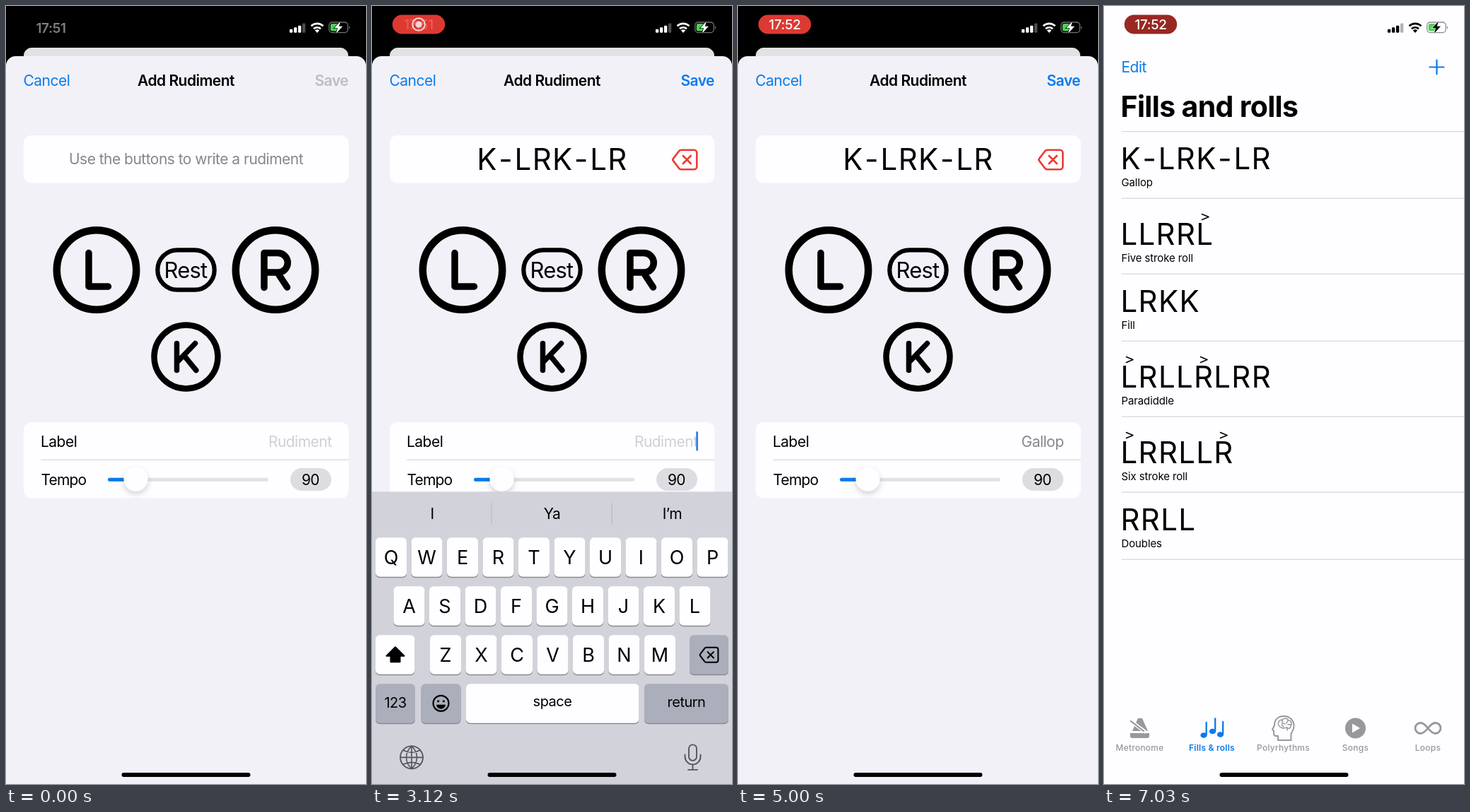
Write an HTML page that moves like this. It is 509 by 1101 pixels and loops after 7.06 s.

```html
<!DOCTYPE html>
<html lang="en">
<head>
<meta charset="utf-8">
<title>Add Rudiment</title>
<style>
html, body { margin: 0; width: 100%; height: 100%; overflow: hidden; background: #000; }
svg { display: block; width: 100vw; height: 100vh; }
text { font-family: Inter, Roboto, sans-serif; font-optical-sizing: none; white-space: pre; }
.dash { letter-spacing: .07em; }
</style>
</head>
<body>
<svg id="stage" viewBox="0 0 509 1101"></svg>
<script>
const LOOP = 7060;
const BLUE = '#0a7aec', WHITE = '#fefdff', PAPER = '#f2f1f8', GRAY = '#98979c';

// [button, down, up]
const taps = [
  ['K', 560, 690], ['-', 850, 960], ['L', 1100, 1200], ['R', 1330, 1440],
  ['K', 1620, 1740], ['-', 1880, 1980], ['L', 2090, 2190], ['R', 2310, 2420]
];
const keys = [
  ['G', 3480, 3560], ['a', 3720, 3790], ['l', 3860, 3920],
  ['l', 3980, 4040], ['o', 4090, 4150], ['p', 4190, 4250]
];
const hints = [
  ['I', 'Ya', 'I’m'], ['Good', 'Got', 'Great'], ['“Ga”', 'Game', 'Gave'],
  ['“Gal”', 'Gals', 'Gallery'], ['“Gall”', 'Gallery', 'Gallon'],
  ['“Gallo”', 'Fallo', 'Galloping'], ['“Gallop”', 'Gallop', 'Galloping']
];
const KB_UP = 2820, KB_DOWN = 4500, DISMISS = 5210;

// markup helpers
const escape = str => str.replace(/&/g, '&amp;').replace(/>/g, '&gt;');
const markup = (x, y, body, o = {}) =>
  `<text x="${x}" y="${y}" ${o.id ? `id="${o.id}"` : ''} text-anchor="${o.at || 'start'}" fill="${o.fill || '#000'}"
   style="font-size:${o.size || 21}px;font-weight:${o.w || 400};letter-spacing:${o.ls ?? -.025}em">${body}</text>`;
const text = (x, y, str, o) => markup(x, y, escape(str), o);
const strokes = str => str.replace(/-/g, '<tspan class="dash" dx="1.5">-</tspan>');
const beatText = (x, y, str, o) => markup(x, y, strokes(str), { size: 42, ls: .031, ...o });
const rect = (x, y, w, h, r, fill, more = '') =>
  `<rect x="${x}" y="${y}" width="${w}" height="${h}" rx="${r}" fill="${fill}" ${more}/>`;
const line = (d, color, w, more = '') =>
  `<path d="${d}" fill="none" stroke="${color}" stroke-width="${w}" stroke-linecap="round" stroke-linejoin="round" ${more}/>`;
const circle = (x, y, r, fill, more = '') => `<circle cx="${x}" cy="${y}" r="${r}" fill="${fill}" ${more}/>`;
const group = (id, body, more = '') => `<g id="${id}" ${more}>${body}</g>`;
const at = (x, y, body, s = 1) => `<g transform="translate(${x} ${y}) scale(${s})">${body}</g>`;

const eraser = (color, w) => line(
  'M-5-13.8H13a4 4 0 0 1 4 4V9.8a4 4 0 0 1-4 4H-5a4 4 0 0 1-3-1.3L-16.3 1.6a2.4 2.4 0 0 1 0-3.2L-8-12.5a4 4 0 0 1 3-1.3ZM-2.5-5.5l11 11m0-11l-11 11', color, w);

function listView() {
  const rows = [
    [231, 'K-LRK-LR', 'Gallop', []], [338, 'LLRRL', 'Five stroke roll', [143]],
    [433, 'LRKK', 'Fill', []], [540, 'LRLLRLRR', 'Paradiddle', [36, 141]],
    [647, 'LRRLLR', 'Six stroke roll', [36, 169]], [742, 'RRLL', 'Doubles', []]
  ];
  const rule = y => rect(25, y, 484, 1.3, 0, '#d9d8dc');
  const tab = (x, label, on) => text(x, 1054, label, { size: 12, w: on ? 600 : 500, ls: .02, at: 'middle', fill: on ? BLUE : GRAY });
  const note = (x, y) => `<ellipse cx="${x}" cy="${y}" rx="4.6" ry="3.8" fill="${BLUE}"/>` + line(`M${x + 3.7} ${y - 1}v-17`, BLUE, 2.3);
  return rect(0, 0, 509, 1101, 0, WHITE)
    + text(24.5, 94, 'Edit', { fill: BLUE }) + line('M460.5 86.5h20M470.5 76.5v20', BLUE, 2.2)
    + text(23.5, 157, 'Fills and rolls', { size: 41, w: 700, ls: -.0165 }) + rule(177)
    + rows.map(([y, beat, name, accents]) =>
      beatText(23.5, y, beat) + text(24.5, y + 24, name, { size: 15, ls: -.008 }) + rule(y + 40.5)
      + accents.map(x => line(`M${x - 4.5} ${y - 43.5}l9.5 4-9.5 4`, '#000', 1.6)).join('')).join('')
    + `<path d="M37 1029h27v4a3 3 0 0 1-3 3H40a3 3 0 0 1-3-3ZM48 1008h6l8 18H40Z" fill="${GRAY}"/>`
    + line('M38 1012l20 15', WHITE, 5) + line('M38 1012l18 14', GRAY, 2.2)
    + note(141, 1032) + note(153.5, 1026.5) + note(164.5, 1031)
    + line('M246 1039v-6h-3q-3 0-3-4v-3l-2-2 3-6c0-9 6-13 13-13 9 0 14.5 6 14.5 14 0 6-3 8-4 11v9Z', GRAY, 2)
    + line('M247 1018c-2-4 1-8 5-8 3-3 7-2 9 1 4 0 5 5 3 8 0 4-4 4-6 2-3 2-9 1-11-3ZM252 1011v4l4 1M260 1011l-2 4M259 1021v4M251 1017l3 3M264 1017h-4', GRAY, 1.5)
    + circle(355.5, 1022, 14.5, GRAY) + `<path d="M351 1015.5v13l11-6.5Z" fill="${WHITE}"/>`
    + line('M458 1022c-4-5-7-7.5-10.5-7.5a7.5 7.5 0 0 0 0 15c3.5 0 6.5-2.5 10.5-7.5s7-7.5 10.5-7.5a7.5 7.5 0 0 1 0 15c-3.5 0-6.5-2.5-10.5-7.5', GRAY, 2.8)
    + tab(50.5, 'Metronome') + tab(152.5, 'Fills & rolls', true) + tab(253.5, 'Polyrhythms') + tab(355.5, 'Songs') + tab(458, 'Loops')
    + rect(0, 0, 509, 1101, 0, '#000', 'id="dim"');
}

function padButton(id, cx, cy, r, w, glyph, gw) {
  return group('pad' + id, circle(cx, cy, r, 'none', `class="face" stroke="#000" stroke-width="${w}"`)
    + line(glyph, '#000', gw, 'class="mark"'));
}

function sheetView() {
  return `<path d="M0 1101V84.5a13.5 13.5 0 0 1 13.5-13.5H495.5a13.5 13.5 0 0 1 13.5 13.5V1101Z" fill="${PAPER}"/>`
    + text(24.5, 113, 'Cancel', { fill: BLUE })
    + text(254.5, 113, 'Add Rudiment', { w: 600, at: 'middle' })
    + text(484, 113, 'Save', { w: 600, at: 'end', id: 'save' })
    + rect(25, 183, 459.5, 67.5, 11, WHITE)
    + text(254.5, 224, 'Use the buttons to write a rudiment', { fill: '#86858a', at: 'middle', id: 'prompt' })
    + beatText(255, 232, '', { at: 'middle', id: 'beat' })
    + group('erase', at(442.3, 217.5, eraser('#ee3b31', 2.6)))
    + padButton('L', 128, 373.5, 56.2, 10.5, 'M117 349.5V397H144.5', 9.5)
    + padButton('R', 381, 373.5, 56.2, 10.5, 'M365 398.5V349.5H384.5a13.8 13.8 0 0 1 0 27.6H365M384 377.5L397.5 398', 9.5)
    + padButton('K', 254.5, 496.5, 45, 8.5, 'M241.5 477.5V515.5M267.5 477.5L242 504M251.5 494.5L268.8 515.5', 7.5)
    + group('pad-', rect(214.3, 345.3, 80.4, 56.4, 28.2, 'none', 'class="face" stroke="#000" stroke-width="6.2"')
      + text(254, 384.5, 'Rest', { size: 31, at: 'middle' }))
    + rect(25, 589, 459.5, 107.5, 11, WHITE) + rect(49.5, 641.6, 435, 1.3, 0, '#d9d8dc')
    + text(49, 623.5, 'Label') + text(460.5, 623.5, '', { at: 'end', id: 'label' })
    + rect(458.3, 602, 2.6, 27.5, 1.2, '#2079e8', 'id="caret"')
    + group('clear', circle(447.5, 616, 10.6, '#85848a') + line('M443.8 612.3l7.4 7.4m0-7.4l-7.4 7.4', WHITE, 2.1))
    + text(49.5, 677.5, 'Tempo', { ls: -.04 })
    + rect(144, 667.7, 227, 5, 2.5, '#e2e1e5') + rect(144, 667.7, 40, 5, 2.5, BLUE)
    + circle(183.5, 669.5, 17, WHITE, 'filter="url(#soft)"')
    + rect(402, 654, 58, 32, 16, '#dddce0') + text(430.5, 677.5, '90', { at: 'middle' });
}

const letterRows = [['qwertyuiop', 5, 65], ['asdfghjkl', 30.5, 134], ['zxcvbnm', 82, 203]];
const PITCH = 50.5, KEY_W = 44, KEY_H = 55.5;
function keySpot(ch) {
  for (const [row, x, y] of letterRows) {
    const i = row.indexOf(ch.toLowerCase());
    if (i >= 0) return [x + i * PITCH, y];
  }
}

function keyboardView() {
  const key = (x, y, w, fill, id = '') => rect(x, y + 1.4, w, KEY_H, 6, '#898b92') + rect(x, y, w, KEY_H, 6, fill, id);
  const letters = upper => letterRows.map(([row]) => [...row].map(c => {
    const [x, y] = keySpot(c);
    return text(x + KEY_W / 2, y + (upper ? 37.5 : 35.5), upper ? c.toUpperCase() : c, { size: upper ? 27 : 28, ls: 0, at: 'middle' });
  }).join('')).join('');
  const DARK = '#abaebb', INK = '#55565b';
  return rect(0, 0, 509, 440, 0, '#d2d3da')
    + rect(169.5, 7, 170, 48, 6, '#e9e9ee', 'id="chosen"')
    + group('bars', rect(168.5, 16, 1.2, 30, 0, '#b9bac1') + rect(338.5, 16, 1.2, 30, 0, '#b9bac1'))
    + [85, 254.5, 424.5].map((x, i) => text(x, 38.5, '', { at: 'middle', id: 'hint' + i })).join('')
    + letterRows.map(([row]) => [...row].map(c => key(...keySpot(c), KEY_W, WHITE)).join('')).join('')
    + group('upper', letters(true)) + group('lower', letters(false))
    + key(5, 203, 55.5, WHITE, 'id="shift"')
    + at(33, 231, line('M0-11L12.5 1.5H6.5V10H-6.5V1.5H-12.5Z', '#000', 2, 'id="arrow"'))
    + key(449, 203, 55, DARK) + at(476.5, 231, eraser('#000', 2.7), .76)
    + key(5, 272, 56, DARK) + text(33, 306, '123', { size: 20, at: 'middle' })
    + key(69.5, 272, 56, DARK)
    + at(97.5, 299.5, circle(0, 0, 11, 'none', 'stroke="#000" stroke-width="2.2"') + circle(-3.8, -3, 1.7, '#000') + circle(3.8, -3, 1.7, '#000')
      + '<path d="M-6.5 2h13a6.5 6 0 0 1-13 0Z"/>')
    + key(133, 272, 244.5, WHITE) + text(255, 304, 'space', { size: 20, at: 'middle' })
    + key(385, 272, 119, DARK, 'id="enter"') + text(444.5, 305, 'return', { size: 20, at: 'middle' })
    + at(56, 376, circle(0, 0, 16, 'none', `stroke="${INK}" stroke-width="1.8"`)
      + line('M0-16V16M-16 0H16M0-16c-10 9-10 23 0 32M0-16c10 9 10 23 0 32M-12-10q12 6 24 0M-12 10q12-6 24 0', INK, 1.6))
    + at(453.5, 376, line('M-5.5-12.5a5.5 5.5 0 0 1 11 0V-1a5.5 5.5 0 0 1-11 0ZM-11-4v3a11 11 0 0 0 22 0v-3M0 10v7.5M-6.5 17.5h13', INK, 1.9))
    + group('bubble', '');
}

function statusView() {
  const bar = (i, h) => rect(401 + i * 6, 37.8 - h, 4.3, h, 1.2, 'currentColor', i === 3 ? 'opacity=".3"' : '');
  return text(63.5, 37.5, '17:51', { size: 19, w: 600, ls: -.02, at: 'middle', fill: '#808084', id: 'plain' })
    + group('pill', rect(28.8, 12.5, 74.4, 27, 13.5, '#ff4238', 'id="pillFace"')
      + text(66, 33, '17:51', { size: 19, w: 500, ls: -.02, at: 'middle', fill: '#fff', id: 'clock' })
      + group('record', circle(66, 26, 8.8, 'none', 'stroke="#fff" stroke-width="1.9"') + circle(66, 26, 4.6, '#fff')))
    + group('meters', [5, 7.5, 10, 13.3].map((h, i) => bar(i, h)).join('')
      + '<path d="M440 38l-3.2-3.5a4.6 4.6 0 0 1 6.4 0Z" fill="currentColor"/>'
      + `<g fill="none" stroke="currentColor" stroke-width="2.6"><path d="M435 32.3a7.3 7.3 0 0 1 10 0"/><path d="M431.5 28.3a12.2 12.2 0 0 1 17 0"/></g>`
      + rect(456.8, 23, 26.5, 14.6, 4.4, 'none', 'stroke="currentColor" stroke-opacity=".45" stroke-width="1.3"')
      + rect(458.8, 25, 12, 10.6, 2.4, '#4cd15b')
      + '<path d="M485 28.2q2.6 2 0 4.4Z" fill="currentColor" opacity=".5"/>'
      + '<path id="bolt" d="M473 21.5l-9 9.8h5l-2.4 7.7 9.4-10.2h-5.2Z" fill="currentColor" stroke-width="1.4" paint-order="stroke"/>');
}

const stage = document.getElementById('stage');
stage.innerHTML = `<defs>
  <clipPath id="frame"><rect id="frameBox" width="509" height="1101"/></clipPath>
  <filter id="soft" x="-50%" y="-50%" width="200%" height="200%"><feDropShadow dx="0" dy="4" stdDeviation="4.5" flood-opacity=".18"/></filter>
  <filter id="lift" x="-30%" y="-30%" width="160%" height="160%"><feDropShadow dx="0" dy="1" stdDeviation="2" flood-opacity=".3"/></filter>
  </defs>` + rect(0, 0, 509, 1101, 0, '#000')
  + group('list', listView(), 'clip-path="url(#frame)"') + group('sheet', sheetView()) + group('keyboard', keyboardView())
  + group('status', statusView()) + rect(163.5, 1085, 182, 6, 3, '#000');

const el = {};
stage.querySelectorAll('[id]').forEach(n => el[n.id] = n);
const set = (id, attrs) => { for (const k in attrs) el[id].setAttribute(k, attrs[k]); };
const show = (id, on) => set(id, { opacity: on ? 1 : 0 });
const write = (id, str) => { if (el[id].textContent !== str) el[id].textContent = str; };

const ramp = (t, a, b) => Math.min(1, Math.max(0, (t - a) / (b - a)));
// critically damped spring, 0 to 1
function spring(t, start, rate) {
  const x = Math.max(0, t - start) / 1000 * rate;
  const p = 1 - (1 + x) * Math.exp(-x);
  return p > .9985 ? 1 : p;
}
const done = (list, t) => list.filter(e => e[2] <= t);
const held = (list, t) => list.find(e => e[1] <= t && t < e[2]);

function drawPads(t) {
  const beat = done(taps, t).map(e => e[0]).join('');
  const down = held(taps, t);
  if (el.beat.textContent !== beat) el.beat.innerHTML = strokes(beat);
  show('prompt', !beat);
  show('erase', beat);
  set('save', { fill: beat ? BLUE : '#bdbcc2', opacity: t >= 5180 && t < 5300 ? .3 : 1 });
  for (const id of ['L', 'R', 'K', '-']) {
    const on = down && down[0] === id;
    const [face, mark] = el['pad' + id].children;
    face.setAttribute('fill', on ? '#000' : 'none');
    mark.setAttribute(id === '-' ? 'fill' : 'stroke', on ? PAPER : '#000');
  }
}

function drawField(t) {
  const typed = done(keys, t).map(e => e[0]).join('');
  const editing = t >= 2800 && t < KB_DOWN;
  const inset = editing && typed ? 29 : 0;
  write('label', typed || 'Rudiment');
  set('label', { x: 460.5 - inset, fill: typed ? '#87868b' : '#d0cfd4' });
  set('caret', { x: 458.3 - inset });
  show('caret', editing);
  show('clear', inset);
}

function drawKeyboard(t) {
  const lift = spring(t, KB_UP, 18.26) - spring(t, KB_DOWN, 18.26);
  set('keyboard', { transform: `translate(0 ${1101 - 425 * lift})`, visibility: lift > 0 ? 'visible' : 'hidden' });
  const upper = t < keys[0][2];
  show('upper', upper);
  show('lower', !upper);
  set('shift', { fill: upper ? WHITE : '#abaebb' });
  set('arrow', { fill: upper ? '#000' : 'none' });
  set('enter', { fill: t >= 4430 && t < KB_DOWN ? WHITE : '#abaebb' });
  const n = done(keys, t - 60).length;
  hints[n].forEach((h, i) => write('hint' + i, h));
  show('chosen', n === 5);
  show('bars', n !== 5);
  const down = held(keys, t);
  let body = '';
  if (down) {
    const [x, y] = keySpot(down[0]);
    const bx = Math.min(429, Math.max(4, x - 16));
    body = `<g filter="url(#lift)">` + rect(x, y - 20, KEY_W, KEY_H + 20, 6, WHITE) + rect(bx, y - 72, 76, 68, 11, WHITE) + '</g>'
      + text(bx + 38, y - 24, down[0], { size: 42, ls: 0, at: 'middle' });
  }
  el.bubble.innerHTML = body;
}

function drawStatus(t, p) {
  const light = Math.round(255 * (1 - ramp(p, .3, .7)));
  el.meters.style.color = `rgb(${light},${light},${light})`;
  set('bolt', { stroke: p > .5 ? WHITE : '#000' });
  set('plain', { opacity: 1 - ramp(t, 0, 180) });
  set('pill', { opacity: ramp(t, 30, 330) });
  const dip = ((1 + Math.cos((t - 3120) / 1880 * 2 * Math.PI)) / 2) ** 4;
  const glow = t < 6670 ? 1 - .13 * dip : 1 - .4 * ramp(t, 6670, 7000);
  set('pillFace', { fill: `rgb(${[255, 66, 56].map(c => Math.round(c * glow))})` });
  const swap = ramp(t, 3060, 3360);
  set('record', { opacity: 1 - swap });
  set('clock', { opacity: swap });
  write('clock', t < 4700 ? '17:51' : '17:52');
}

function draw(t) {
  const p = spring(t, DISMISS, 14);
  const s = .902 + .098 * p;
  set('list', { transform: `translate(${509 * (1 - s) / 2} ${59 * (1 - p)}) scale(${s})` });
  set('frameBox', { rx: 13 * (1 - p) });
  set('dim', { opacity: .11 * (1 - p) });
  set('sheet', { transform: `translate(0 ${1040 * p})`, visibility: p < 1 ? 'visible' : 'hidden' });
  drawPads(t);
  drawField(t);
  drawKeyboard(t);
  drawStatus(t, p);
}

const start = performance.now();
function tick() {
  draw((performance.now() - start) % LOOP);
  requestAnimationFrame(tick);
}
tick();
</script>
</body>
</html>
```
